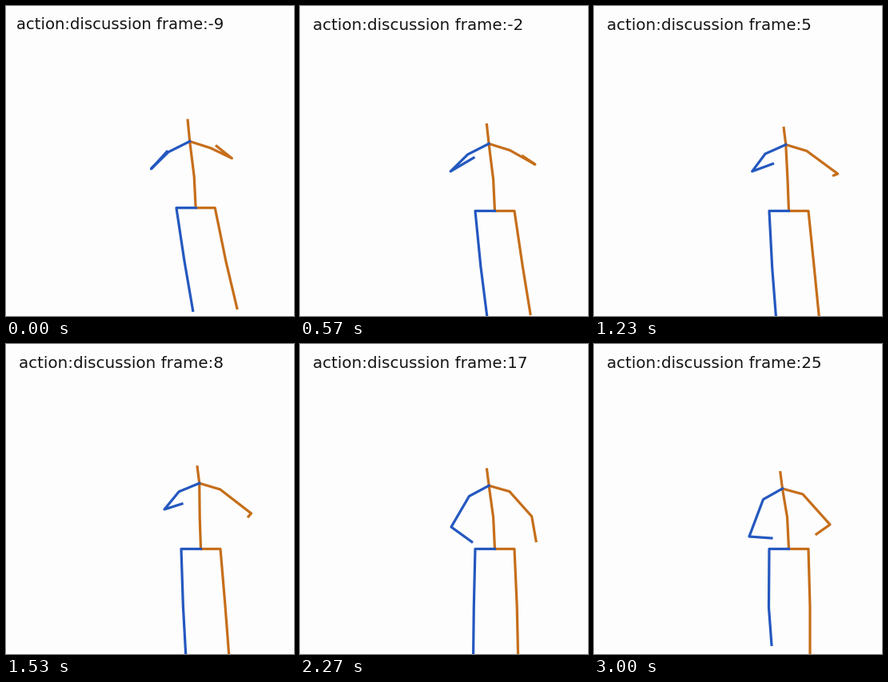
Animation, 360 px wide and 388 px high, one loop 3030 ms. Source, as a matplotlib script:

```python
import numpy as np
import matplotlib.pyplot as plt
from matplotlib.animation import FuncAnimation

W, H, DPI = 360, 388, 72
LOOP_MS, TICK_MS = 3030, 10
HOLD_MS = 70            # opening view, slightly smaller
STEP_MS, LEAD_MS = 90, 75
FIRST, LAST = -9, 25
STEPS = LAST - FIRST
BLUE, ORANGE = "#2458c0", "#c66e1a"
FONT_PX, LINE_PX = 19.9, 3.2

CHAINS = [
    (ORANGE, "head neck spine hip r_hip r_knee r_foot"),
    (ORANGE, "neck r_shoulder r_elbow r_hand"),
    (BLUE, "neck l_shoulder l_elbow l_hand"),
    (BLUE, "hip l_hip l_knee l_foot"),
]


def ease(n, start, end):
    u = np.clip((n - start) / (end - start), 0, 1)
    return u * u * (3 - 2 * u)


def gesture(n, origin, *moves):
    """Add eased moves (start, end, dx, dy) to a starting point."""
    p = np.array(origin, float)
    for start, end, dx, dy in moves:
        p += ease(n, start, end) * np.array([dx, dy])
    return p


def torso(n, t):
    lean = np.exp(-((n - 17.5) / 5.5) ** 2)     # brief sway to the right
    nod = np.exp(-(n / 9) ** 2)
    neck = np.array([236 + 6 * lean - 0.5 * t, 172 + 9 * t**2])
    return {
        "neck": neck,
        "head": neck + (-2.6, -20.3 - 6.5 * nod),
        "spine": (242 + 0.1 * (neck[0] - 240), 217),
        "hip": (243.5, 256.5),
        "l_hip": (219, 256.5),
        "r_hip": (268, 256.5),
        "l_shoulder": neck + (-27 + 3 * t, 13.5 - 3 * lean),
        "r_shoulder": neck + (26.5 - t, 8.5 - 1.5 * t),
    }


def arms(n):
    return {
        "l_elbow": gesture(n, (187, 207), (5, 15, 11, 0),
                           (17, 22, -9, 22), (29, 34, 5, 12)),
        "l_hand": gesture(n, (207, 185), (3, 11, 20, 10), (11, 17, -7, 5),
                          (17, 22, 2, 27), (22, 29, -12, 34),
                          (29, 34, 12, -18)),
        "r_elbow": gesture(n, (289.5, 193.5), (2, 17, 17, 18.5),
                           (17, 22, -6.5, 5), (22, 29, -17, -2),
                           (29, 34, 12, 11)),
        "r_hand": gesture(n, (270, 178), (2, 17, 33, 38), (17, 22, 1.5, 20),
                          (22, 29, -15.5, 17.5), (29, 34, -11, -15.5)),
    }


def legs(n, t):
    lift = ease(n, 29, 34)
    settle = (1 - t) ** 1.6
    return {
        "l_knee": (229 - 0.45 * n + 4.8 * lift, 323 + 7 * t**0.6),
        "l_foot": (240 - 0.9 * n + 12.6 * lift, 387 + 3 * t - 13.5 * lift),
        "r_knee": (270 + 12 * settle, 325 + 4 * t),
        "r_foot": (270 + 26 * settle, 384 + 7 * t),
    }


def pose(n):
    t = n / STEPS
    return {**torso(n, t), **arms(n), **legs(n, t)}


def step_at(ms):
    if ms < HOLD_MS:
        return 0
    return min((ms + LEAD_MS) // STEP_MS, STEPS)


def view(pts, opening):
    pts = np.asarray(pts, float)
    return pts * 0.985 - (2.76, 0) if opening else pts


fig = plt.figure(figsize=(W / DPI, H / DPI), dpi=DPI, facecolor="#fdfdfd")
ax = fig.add_axes([0, 0, 1, 1])
ax.set_xlim(0, W)
ax.set_ylim(H, 0)
ax.axis("off")

lines = [ax.plot([], [], color=color, lw=LINE_PX * 72 / DPI,
                 solid_joinstyle="round", solid_capstyle="projecting")[0]
         for color, _ in CHAINS]
label = ax.text(0, 0, "", family="DejaVu Sans", color="#141414",
                ha="left", va="baseline")


def draw(i):
    ms = i * TICK_MS
    opening = ms < HOLD_MS
    n = step_at(ms)
    joints = pose(n)
    for line, (_, names) in zip(lines, CHAINS):
        pts = view([joints[name] for name in names.split()], opening)
        line.set_data(pts[:, 0], pts[:, 1])
    label.set_position(view((15.7, 29.7), opening))
    label.set_fontsize(FONT_PX * (0.985 if opening else 1) * 72 / DPI)
    label.set_text(f"action:discussion frame:{FIRST + n}")
    return [*lines, label]


anim = FuncAnimation(fig, draw, frames=LOOP_MS // TICK_MS,
                     interval=TICK_MS, repeat=True)
plt.show()
```
